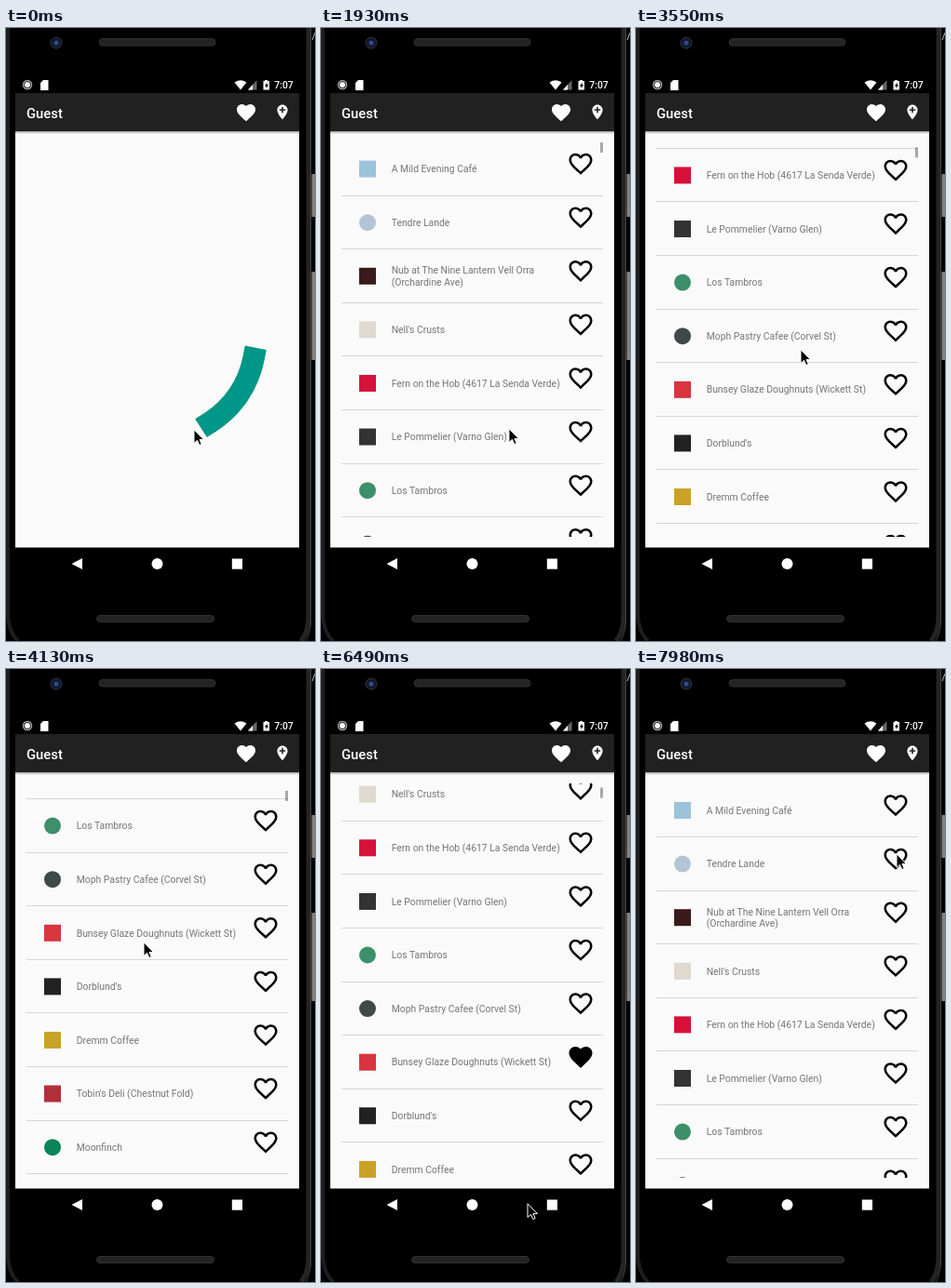
Recreate the animation shown at these times as an HTML page. Size 332 by 659 pixels, loop 8000 ms.

```html
<!DOCTYPE html>
<html lang="en">
<head>
<meta charset="utf-8">
<title>Guest list</title>
<style>
  html, body { margin: 0; width: 100%; height: 100%; overflow: hidden; background: #000; }
  svg { display: block; }
  text { font-family: Roboto, sans-serif; }
  #list text { font-size: 10.39px; fill: #757575; }
  .line { fill: #d6d6d6; shape-rendering: crispEdges; }
</style>
</head>
<body>
<svg width="332" height="659" viewBox="0 0 332 659">
  <defs>
    <path id="full" d="M12 21.35l-1.45-1.32C5.4 15.36 2 12.28 2 8.5 2 5.42 4.42 3 7.5 3c1.74 0 3.41.81 4.5 2.09C13.09 3.81 14.76 3 16.5 3 19.58 3 22 5.42 22 8.5c0 3.78-3.4 6.86-8.55 11.54z"/>
    <path id="outline" d="M16.5 3c-1.74 0-3.41.81-4.5 2.09C10.91 3.81 9.24 3 7.5 3 4.42 3 2 5.42 2 8.5c0 3.78 3.4 6.86 8.55 11.54L12 21.35l1.45-1.32C18.6 15.36 22 12.28 22 8.5 22 5.42 19.58 3 16.5 3zm-4.4 15.55l-.1.1-.1-.1C7.14 14.24 4 11.39 4 8.5 4 6.5 5.5 5 7.5 5c1.54 0 3.04.99 3.57 2.36h1.87C13.46 5.99 14.96 5 16.5 5c2 0 3.5 1.5 3.5 3.5 0 2.89-3.14 5.74-7.9 10.05z"/>
    <linearGradient id="shade" x2="0" y2="1">
      <stop stop-color="#000" stop-opacity=".35"/>
      <stop offset="1" stop-color="#000" stop-opacity="0"/>
    </linearGradient>
  </defs>

  <!-- phone body -->
  <path d="M2 0V632Q3 650 13 659" fill="none" stroke="#1e1e1e" stroke-width="4"/>
  <path d="M325 0V636Q324 650 317 659" fill="none" stroke="#242424" stroke-width="5"/>
  <path d="M327.500 0V640Q326 652 322 659" fill="none" stroke="#444"/>
  <path d="M329 13L332 5" stroke="#bbb"/>
  <g fill="#85817d">
    <rect x="328.500" y="157" width="4" height="46"/>
    <rect x="328.500" y="262" width="4" height="95"/>
  </g>
  <g fill="#232323" stroke="#303030">
    <rect x="100" y="11.500" width="125" height="7.500" rx="3.700"/>
    <rect x="97.500" y="631.500" width="126" height="7" rx="3.500"/>
  </g>
  <circle cx="54" cy="16" r="6" fill="#10182c" stroke="#30343c"/>
  <circle cx="54" cy="16" r="2.500" fill="#2f4a86"/>

  <!-- status bar -->
  <circle cx="23" cy="61" r="4.500" fill="none" stroke="#aaa" stroke-width="1.500"/>
  <circle cx="23" cy="61" r="3" fill="#fff"/>
  <path d="M40 56H45.500V67H37V59Z" fill="#fff"/>
  <path d="M245.500 58.500Q252 54 258.500 58.500L252 66.500Z" fill="#fff"/>
  <path d="M269.500 56V66.500H260Z" fill="#666"/>
  <path d="M265 61V66.500H260Z" fill="#fff"/>
  <path d="M278 56H281V57H283V66.500H276.500V57H278Z" fill="#fff"/>
  <path d="M280.500 58.500L278 62.500H279.500V65L282 61H280.500Z" fill="#000"/>
  <text x="288.300" y="65" font-size="10.4" font-weight="500" fill="#fff">7:07</text>

  <!-- app -->
  <rect x="10" y="111" width="305" height="447.500" fill="#fafafa"/>
  <rect x="10" y="70" width="305" height="41" fill="#212121"/>
  <rect x="10" y="111" width="305" height="3" fill="url(#shade)"/>
  <text x="22" y="96.500" font-size="14.84" font-weight="500" fill="#fff">Guest</text>
  <use href="#full" x="246" y="79" fill="#fff"/>
  <path transform="translate(287.400 80.800) scale(.8)" fill="#fff" d="M12 2C8.140 2 5 5.140 5 9c0 5.250 7 13 7 13s7-7.750 7-13c0-3.860-3.140-7-7-7zm4 8h-3v3h-2v-3H8V8h3V5h2v3h3v2z"/>

  <circle id="spinner" cx="162.500" cy="335" r="105.500" pathLength="360" fill="none"
          stroke="#009688" stroke-width="23.500" stroke-linecap="square"/>

  <svg id="list" x="22" y="123" width="281" height="424" viewBox="22 123 281 424">
    <g id="rows"></g>
    <rect id="bar" x="300" width="3" height="11"/>
  </svg>

  <!-- navigation bar -->
  <g fill="#fff">
    <path d="M70.500 576L82 570V582Z"/>
    <circle cx="162.500" cy="576" r="6"/>
    <rect x="242.800" y="570.500" width="11.200" height="11.200"/>
  </g>

  <path id="cursor" d="M0 .8V15.500L3.500 12.300 5.800 17.500 8.200 16.500 6 11.400H10.500Z" fill="#000" stroke="#fff"/>
</svg>

<script>
const LOOP = 8000, REFRESH = 147.6, LIST_AT = 590, LIKE_AT = 5160, LIKED = 8;
const PITCH = 57.6, BADGE = 18;
const $ = id => document.getElementById(id);

const places = [
  ['A Mild Evening Café', '#9cc3dc'],
  ['Tendre Lande', '#b3c4d6', 'round'],
  ['Nub at The Nine Lantern Vell Orra|(Orchardine Ave)', '#3b1a1c'],
  ["Nell's Crusts", '#e0d9d0'],
  ['Fern on the Hob (4617 La Senda Verde)', '#d6123a'],
  ['Le Pommelier (Varno Glen)', '#333'],
  ['Los Tambros', '#3d8f6a', 'round'],
  ['Moph Pastry Cafee (Corvel St)', '#3d4a47', 'round'],
  ['Bunsey Glaze Doughnuts (Wickett St)', '#d8353f'],
  ["Dorblund's", '#222'],
  ['Dremm Coffee', '#c9a227'],
  ["Tobin's Deli (Chestnut Fold)", '#b0303a'],
  ['Moonfinch', '#0b8457', 'round']
];

$('rows').innerHTML = places.map(([label, color, round], i) => {
  const y = 152 + PITCH * i, lines = label.split('|');
  const text = lines.map((line, k) =>
    `<text x="75.700" y="${y + 3.7 + (k - (lines.length - 1) / 2) * 12.2}">${line}</text>`).join('');
  return `<rect x="${50 - BADGE / 2}" y="${y - BADGE / 2}" width="${BADGE}" height="${BADGE}"
      rx="${round ? BADGE / 2 : 0}" fill="${color}"/>${text}
    <use class="heart" href="#outline" transform="translate(264 ${y - 20.5}) scale(1.25)"/>
    <rect class="line" x="22" y="${y + 28}" width="281" height="1"/>`;
}).join('');
const likedHeart = document.querySelectorAll('.heart')[LIKED];

const ramp = (t, from, to) => Math.max(0, Math.min(1, (t - from) / (to - from)));
const smooth = u => u * u * (3 - 2 * u);
const swipe = (t, from, to, distance) => distance * smooth(ramp(t, from, to));

const scrollAt = t =>
  swipe(t, 1900, 2617, 224) + swipe(t, 3542, 4130, 105) + swipe(t, 5960, 7153, -329);

// The pointer glides to each place: start, end, x, y
const glides = [
  [1900, 2360, 192, 238],
  [2970, 3542, 177, 345],
  [3542, 4130, 148, 293],
  [4280, 5160, 278, 272],
  [5480, 6490, 222, 574],
  [6640, 7530, 277, 175],
  [7680, 7970, 280, 198]
];

function cursorAt(t) {
  let x = 202, y = 431;
  for (const [from, to, toX, toY] of glides) {
    const u = smooth(ramp(t, from, to));
    x += (toX - x) * u;
    y += (toY - y) * u;
  }
  return `${x} ${y}`;
}

function drawSpinner(t) {
  const sweep = 270 * smooth(ramp(t, -175, 490));
  $('spinner').setAttribute('stroke-dasharray', `${sweep} ${360 - sweep}`);
  $('spinner').setAttribute('transform', `rotate(${11.1 + t * 0.23} 162.5 335)`);
}

function draw(now) {
  // The screen refreshes in steps; the margin absorbs rounding of the step length
  const t = REFRESH * Math.floor((now % LOOP + 8) / REFRESH);
  const scroll = scrollAt(t), loaded = t >= LIST_AT;
  $('spinner').style.display = loaded ? 'none' : '';
  $('list').style.display = loaded ? '' : 'none';
  drawSpinner(t);
  $('rows').setAttribute('transform', `translate(0 ${-scroll})`);
  $('bar').setAttribute('y', 123 + scroll * 0.024);
  $('bar').setAttribute('opacity', 0.33 * (1 - ramp(t, 7153, 7520)));
  likedHeart.setAttribute('href', t >= LIKE_AT ? '#full' : '#outline');
  $('cursor').setAttribute('transform', `translate(${cursorAt(t)})`);
}

const start = performance.now();
function tick() {
  draw(performance.now() - start);
  requestAnimationFrame(tick);
}
tick();
</script>
</body>
</html>
```
